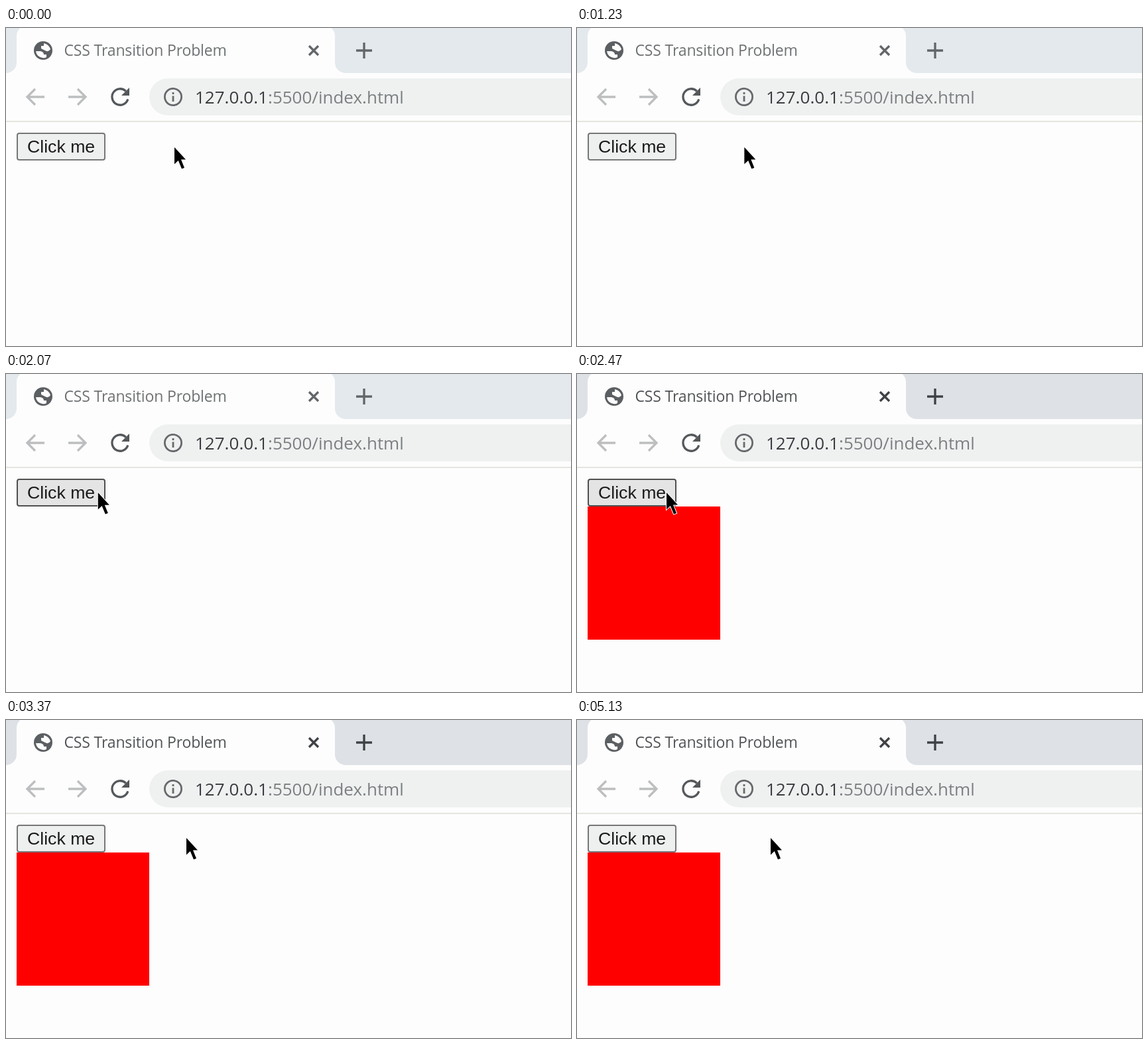
An HTML page that plays this animation: 852 by 480 pixels, repeating every 5.19 s.

```html
<!DOCTYPE html>
<html lang="en">
<head>
<meta charset="utf-8">
<title>Button demo</title>
<style>
  html, body { margin: 0; width: 100%; height: 100%; overflow: hidden; background: #fdfdfd; }
  svg { display: block; width: 100vw; height: 100vh; }
  .ui { font-family: "Open Sans", "Noto Sans", sans-serif; }
  .btn { font-family: "Liberation Sans", Arial, sans-serif; }
  .line { fill: none; stroke-width: 3.3; }
</style>
</head>
<body>
<svg viewBox="0 0 852 480" xmlns="http://www.w3.org/2000/svg">
  <rect width="852" height="480" fill="#fdfdfd"/>
  <rect id="strip" width="852" height="68"/>
  <path d="M0 68a16 16 0 0 0 16-16V12a16 16 0 0 1 16-16H480a16 16 0 0 1 16 16V52a16 16 0 0 0 16 16z" fill="#fdfdfd"/>

  <!-- tab -->
  <circle cx="56" cy="34" r="14" fill="#5c5f62"/>
  <path d="M45 35h7q5 1 5 5h4v4q-3 2-6 1-9-2-10-10zM57 23q8 2 10 9-3 5-8 2l-6-3v-4h4z" fill="#fdfdfd"/>
  <text id="title" class="ui" x="87.5" y="42" font-size="23" letter-spacing="-.16">CSS Transition Problem</text>
  <path id="close" class="line" d="M457 27l14 14m0-14l-14 14"/>
  <path id="plus" class="line" d="M528 34h24m-12-12v24"/>

  <!-- toolbar -->
  <g class="line" stroke="#bcbebf">
    <path d="M58 104H33M44 92L32 104l12 12"/>
    <path d="M94 104h25M108 92l12 12-12 12"/>
  </g>
  <path class="line" d="M180.7 95.3A12.2 12.2 0 1 0 183.8 107.5" stroke="#55585b"/>
  <path d="M186 90v12h-12z" fill="#55585b"/>
  <rect x="216" y="76" width="700" height="56" rx="28" fill="#eff1f1"/>
  <g stroke="#66696c" fill="none" stroke-width="2.8">
    <circle cx="252" cy="104" r="12.6"/>
    <path d="M252 97v3m0 2.5v8.5"/>
  </g>
  <text class="ui" x="285" y="114" font-size="26" fill="#7d8082"><tspan fill="#3a3c3f">127.0.0.1</tspan>:5500/index.html</text>
  <rect y="140" width="852" height="2" fill="#e6e6e1"/>

  <!-- page -->
  <rect id="box" x="16" y="200" width="200" height="201" fill="#fe0000"/>
  <rect id="button" x="17" y="159" width="132" height="40" rx="3" stroke-width="2"/>
  <text class="btn" x="32" y="188" font-size="26.67" fill="#1a1a1a">Click me</text>
  <path id="cursor" d="M0 0V25.5L5.8 20 11 32.5 15 31 10 18.6H17z" stroke="#fdfdfd" stroke-width="2" paint-order="stroke"/>
</svg>
<script>
const LOOP = 5190, PRESS = 2400, REVEAL = 2440;

// Pointer glides: from one time to another, by so many pixels
const GLIDES = [
  { from: 1160, to: 2180, dx: -119, dy: -1 },
  { from: 2855, to: 3070, dx: 137, dy: -1 },
  { from: 3440, to: 3850, dx: 20, dy: 0 }
];

const $ = id => document.getElementById(id);
const paint = (id, attrs) => {
  for (const name in attrs) $(id).setAttribute(name, attrs[name]);
};

function ease(t, from, to) {
  const k = Math.min(1, Math.max(0, (t - from) / (to - from)));
  return k * k * (3 - 2 * k);
}

function pointer(t) {
  let x = 254, y = 180;
  for (const g of GLIDES) {
    const k = ease(t, g.from, g.to);
    x += g.dx * k;
    y += g.dy * k;
  }
  return [x, y];
}

function draw(t) {
  const [x, y] = pointer(t);
  const active = t >= PRESS, hover = x < 150;
  const icon = active ? "#3f4245" : "#636669";
  paint("strip", { fill: active ? "#dee1e5" : "#e3e9ec" });
  paint("title", { fill: active ? "#505356" : "#6e7173" });
  paint("close", { stroke: icon });
  paint("plus", { stroke: icon });
  paint("box", { visibility: t >= REVEAL ? "visible" : "hidden" });
  paint("button", {
    fill: hover ? "#e4e4e5" : "#eeefef",
    stroke: hover ? "#505052" : "#777779"
  });
  paint("cursor", { transform: `translate(${x.toFixed(2)} ${y.toFixed(2)})` });
}

const start = performance.now();
function tick() {
  draw((performance.now() - start) % LOOP);
  requestAnimationFrame(tick);
}
tick();
</script>
</body>
</html>
```
